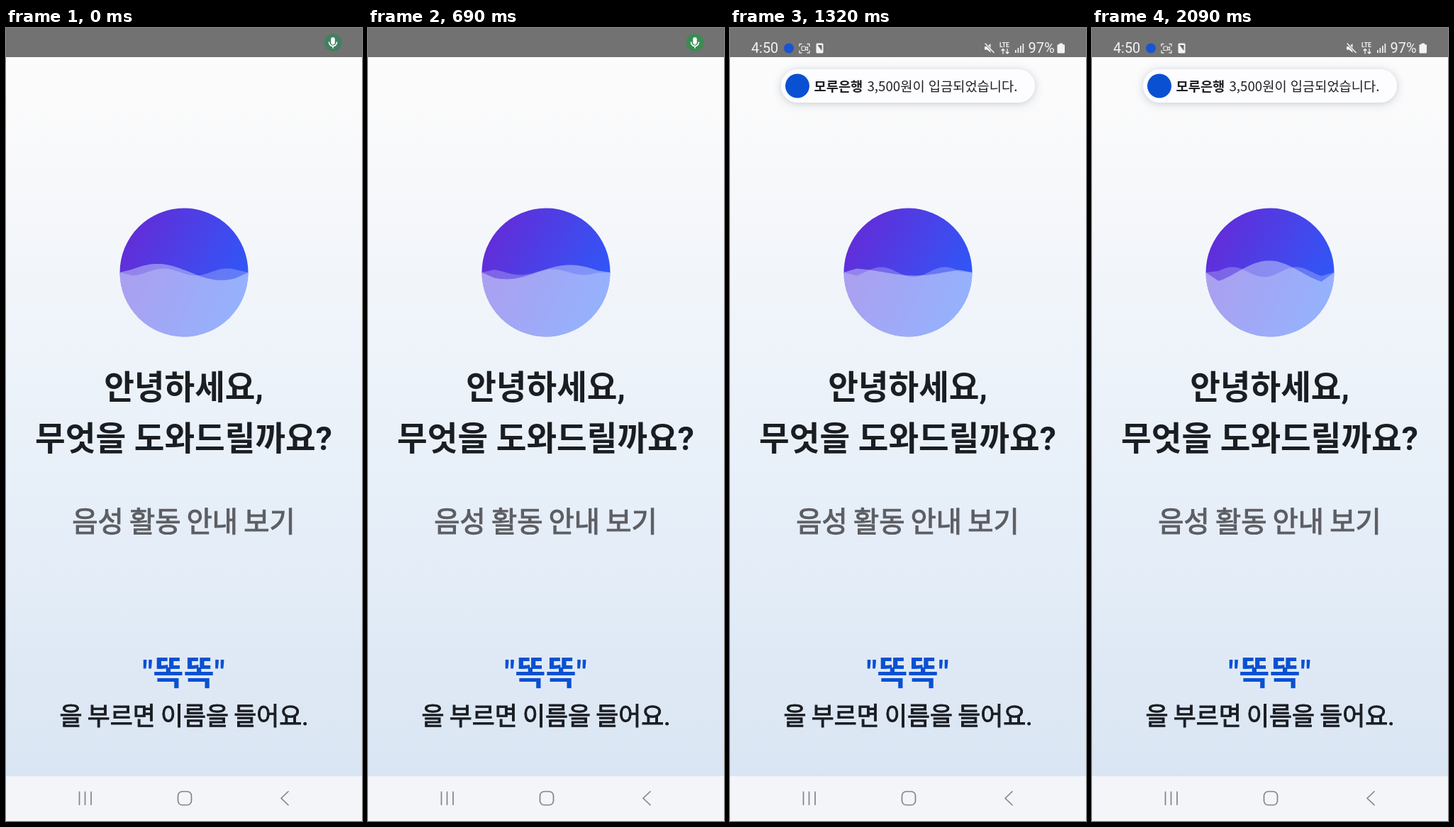
These frames come from a looping animation (502 by 1116 pixels, 2.16 s). An HTML page:

```html
<!DOCTYPE html>
<html lang="ko">
<head>
<meta charset="utf-8">
<title>음성 안내</title>
<style>
  html, body { margin: 0; width: 100%; height: 100%; overflow: hidden; background: #f4f5f9; }
  svg { display: block; width: 100vw; height: 100vh; }
  text { font-family: "Noto Sans CJK KR", "Noto Sans CJK", sans-serif; }
  .mid { text-anchor: middle; font-family: Roboto, "Noto Sans CJK KR", "Noto Sans CJK", sans-serif; }
  .bold { font-weight: 700; }
  .semi { stroke: currentColor; fill: currentColor; stroke-width: .028em; word-spacing: -.04em; }
  .latin { font-family: Roboto, sans-serif; }
  .line { fill: none; stroke-linecap: round; stroke-linejoin: round; }
</style>
</head>
<body>
<svg viewBox="0 0 502 1116" preserveAspectRatio="none">
  <defs>
    <linearGradient id="sky" x1="0" y1="0" x2="0" y2="1">
      <stop offset="0" stop-color="#fcfcfc"/>
      <stop offset=".17" stop-color="#f7f8fa"/>
      <stop offset=".37" stop-color="#eff4fa"/>
      <stop offset=".66" stop-color="#e5eef8"/>
      <stop offset="1" stop-color="#dae5f3"/>
    </linearGradient>
    <linearGradient id="orb" gradientUnits="userSpaceOnUse" x1="165" y1="300" x2="340" y2="390">
      <stop offset="0" stop-color="#632cd8"/>
      <stop offset="1" stop-color="#2a5cfb"/>
    </linearGradient>
    <clipPath id="orbClip"><circle cx="251" cy="344" r="90.5"/></clipPath>
    <clipPath id="pillClip"><rect id="pillMask" y="58" height="47" rx="23.5"/></clipPath>
    <filter id="shadow" x="-20%" y="-60%" width="140%" height="220%">
      <feDropShadow dx="0" dy="1.5" stdDeviation="6" flood-color="#4c5870" flood-opacity=".3"/>
    </filter>
  </defs>

  <rect y="40" width="502" height="1014" fill="url(#sky)"/>
  <rect width="502" height="41" fill="#727272"/>

  <g id="mic">
    <circle id="micDisc" cx="461" cy="20.5" r="12.5"/>
    <rect x="458.2" y="13" width="5.6" height="10.4" rx="2.8" fill="#fff"/>
    <path class="line" d="M455.5 20a5.5 5.5 0 0 0 11 0M461 25.5v2.5" stroke="#fff" stroke-width="1.6"/>
  </g>

  <g id="status" fill="#f3f3f3">
    <text class="latin" x="30" y="35" font-size="19.8">4:50</text>
    <circle cx="83" cy="28.5" r="7" fill="#1a55cf"/>
    <path class="line" d="M98 25.5v-3h3M109 22.5h3v3M112 32v3h-3M101 35h-3v-3" stroke="#e6e6e6" stroke-width="1.4"/>
    <g id="camera" class="line" stroke="#e6e6e6" stroke-width="1.2">
      <rect x="101" y="26" width="5.5" height="5.5" rx="1"/>
      <path d="M107 28l2.5-1.5v5l-2.5-1.5"/>
    </g>
    <rect x="121.5" y="21.5" width="10" height="14" rx="1.5"/>
    <path d="M123.5 24h6v8z" fill="#666"/>
    <path d="M359 26h3.5l5-4v12.5l-5-4H359z"/>
    <path class="line" d="M360 22l12 12.5" stroke="#727272" stroke-width="3"/>
    <path class="line" d="M360 22l12 12.5" stroke="#f3f3f3" stroke-width="1.5"/>
    <text class="latin bold" x="380" y="27" font-size="8.6">LTE</text>
    <path class="line" d="M385 36v-6.5l-2 2M385 29.5l2 2M391 29.5v6.5l-2-2M391 36l2-2" stroke="#f3f3f3" stroke-width="1.3"/>
    <path d="M402 31h1.7v4h-1.7zM405.5 28h1.7v7h-1.7zM409 25h1.7v10h-1.7zM412.5 22h1.7v13h-1.7z"/>
    <text class="latin" x="420.5" y="35" font-size="20">97%</text>
    <path d="M464.5 21.5h4.5v1.5h1.5a1.5 1.5 0 0 1 1.5 1.5v9.5a1.5 1.5 0 0 1-1.5 1.5h-7.5a1.5 1.5 0 0 1-1.5-1.5v-9.5a1.5 1.5 0 0 1 1.5-1.5h1.5z"/>
  </g>

  <g id="notice">
    <rect id="pill" y="58" height="47" rx="23.5" fill="#fdfdff" filter="url(#shadow)"/>
    <g id="message" clip-path="url(#pillClip)" font-size="18.7" fill="#1d1f24">
      <text class="bold" x="118.5" y="88.5">모루은행</text>
      <text x="193.5" y="88.5">3,500원이 입금되었습니다.</text>
    </g>
    <circle id="badge" cy="81.5" fill="#0a50d2"/>
  </g>

  <g clip-path="url(#orbClip)">
    <rect x="160" y="253" width="182" height="182" fill="url(#orb)"/>
    <path id="rearWave" fill="#ecfbff" fill-opacity=".245"/>
    <path id="frontWave" fill="#ecfbff" fill-opacity=".4"/>
  </g>

  <g fill="#1a1d22">
    <text class="mid bold" x="250.5" y="522" font-size="46.4">안녕하세요,</text>
    <text class="mid bold" x="250.5" y="593.5" font-size="46.4">무엇을 도와드릴까요?</text>
    <text class="mid semi" x="250.5" y="708.5" font-size="39.4" color="#5d5e63">음성 활동 안내 보기</text>
    <text class="mid bold" x="250.5" y="923.5" font-size="47" fill="#0a50d2">"똑똑"</text>
    <text class="mid semi" x="251" y="981" font-size="34.8" color="#1a1d22">을 부르면 이름을 들어요.</text>
  </g>

  <rect y="1053" width="502" height="63" fill="#f4f5f9"/>
  <g class="line" stroke="#80838f" stroke-width="1.7">
    <path d="M103.5 1075v18M111.5 1075v18M120 1075v18"/>
    <rect x="242.5" y="1074.5" width="19" height="19" rx="6"/>
    <path d="M398 1074.5l-10 9.500 10 9.500"/>
  </g>
</svg>
<script>
const LOOP = 2160;
const RIM = 344, LEVEL = 343.4, LEFT = 160.5, RIGHT = 341.5, INSET = 18;
const SWELL = 1740; // time in which the front wave travels its own length
const times = [0, 480, 690, 970, 1320, 1740, 2090];
const front = {
  length: 180,
  crest: t => 213.5 + 180 * t / SWELL,
  height: [11.5, 12, 10, 6, 5, 11.5, 16]
};
const rear = {
  length: 90,
  crest: t => sample([312, 285, 260, 238, 213, 222, 198], t),
  height: [5, 5, 4, 4, 7, 5.5, 7]
};

const el = id => document.getElementById(id);
const set = (id, attrs) => {
  for (const name in attrs) el(id).setAttribute(name, attrs[name]);
};
const mix = (a, b, k) => a + (b - a) * k;
const ramp = (t, from, to) => Math.min(1, Math.max(0, (t - from) / (to - from)));
const easeOut = k => 1 - (1 - k) ** 3;

function sample(values, t) {
  let i = 0;
  while (i < times.length - 2 && t > times[i + 1]) i++;
  return mix(values[i], values[i + 1], (t - times[i]) / (times[i + 1] - times[i]));
}

// Both ends of the surface stay pinned to the rim at rest level.
function wavePath(wave, t) {
  const crest = wave.crest(t), height = sample(wave.height, t);
  let d = `M${LEFT} ${RIM}`;
  for (let x = LEFT + INSET; x <= RIGHT - INSET; x += 2.5) {
    const y = LEVEL - height * Math.cos((x - crest) / wave.length * 2 * Math.PI);
    d += `L${x} ${y.toFixed(2)}`;
  }
  return d + `L${RIGHT} ${RIM}V436H${LEFT}Z`;
}

function drawStatus(t) {
  const warm = ramp(t, 0, 600);
  const disc = [mix(67, 58, warm), mix(128, 140, warm), mix(98, 82, warm)];
  set('micDisc', { fill: `rgb(${disc})` });
  set('mic', { opacity: 1 - ramp(t, 760, 840) });
  set('status', { opacity: ramp(t, 820, 920) });
  set('camera', { opacity: ramp(t, 1040, 1180) });
}

function drawNotice(t) {
  const drop = easeOut(ramp(t, 900, 1180));
  const grow = easeOut(ramp(t, 1080, 1310));
  const half = mix(23.5, 179, grow);
  const box = { x: 251 - half, width: half * 2 };
  set('pill', { ...box, opacity: ramp(t, 1060, 1140) });
  set('pillMask', box);
  set('message', { opacity: ramp(t, 1160, 1300) });
  set('badge', { cx: mix(251, 95, grow), r: mix(24, 17, grow) });
  set('notice', {
    opacity: ramp(t, 940, 1110),
    transform: `translate(0 ${mix(-50, 0, drop)})`
  });
}

function draw(t) {
  set('frontWave', { d: wavePath(front, t) });
  set('rearWave', { d: wavePath(rear, t) });
  drawStatus(t);
  drawNotice(t);
}

const start = performance.now();
function tick() {
  draw((performance.now() - start) % LOOP);
  requestAnimationFrame(tick);
}
tick();
</script>
</body>
</html>
```
